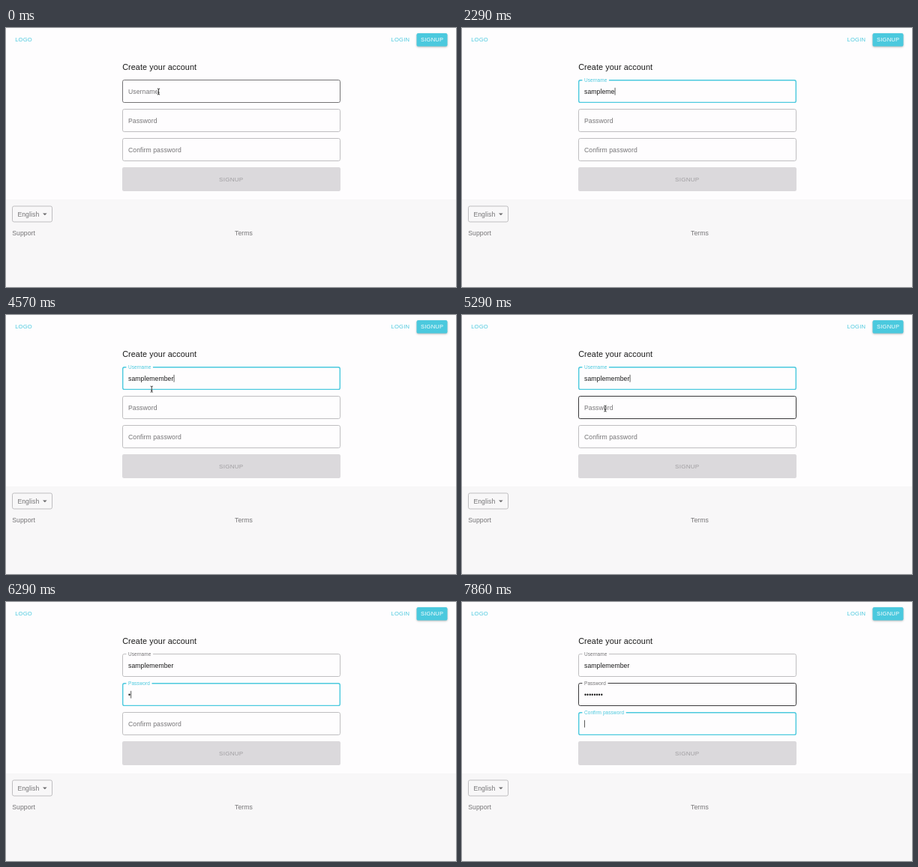
Write an HTML page with a canvas that moves like this. It is 600 px wide and 346 px high and loops after 8 s.

```html
<!DOCTYPE html>
<html lang="en">
<head>
<meta charset="utf-8">
<title>Sign-up form</title>
<style>
  html, body { margin: 0; width: 100%; height: 100%; overflow: hidden; background: #fefdfe; }
  canvas { display: block; width: 600px; height: 346px; }
</style>
</head>
<body>
<canvas id="stage"></canvas>
<script>
const canvas = document.getElementById('stage');
const ctx = canvas.getContext('2d');
const W = 600, H = 346, FPS = 7, LOOP = 8000;
const ratio = window.devicePixelRatio || 1;
canvas.width = W * ratio;
canvas.height = H * ratio;

const CYAN = '#4bc9de', GREY = '#757476', LINE = '#bfbec0', INK = '#1a1a1a';
const BODY = 8.64, SMALL = 7.57;
const LEFT = 163;
const NAME = 'samplemember';

// All event times are counted in ticks of 1/7 s.
const fields = [
  { label: 'Username', y: 69, focus: 2.8, blur: 38.8, hoverInk: '#747375',
    keys: [5, 6, 7, 8, 11, 12, 13, 14, 20, 21, 28, 29], value: n => NAME.slice(0, n) },
  { label: 'Password', y: 108, focus: 38.8, blur: 52.8, hoverInk: '#39383a',
    keys: [44, 45, 47, 48, 49, 50, 51, 52], value: n => '•'.repeat(n) },
  { label: 'Confirm password', y: 147, focus: 52.8, blur: Infinity, hoverInk: '#39383a',
    keys: [], value: () => '' }
];

const clamp = v => Math.max(0, Math.min(1, v));
const mix = (a, b, p) => a + (b - a) * p;
const easeOut = p => 1 - (1 - p) ** 3;
const smooth = p => p * p * (3 - 2 * p);

function setFont(size, spacing) {
  ctx.font = size + 'px "Liberation Sans", Arial, sans-serif';
  ctx.letterSpacing = size * spacing + 'px';
}

function text(str, x, y, size, color, spacing = 0.0094) {
  setFont(size, spacing);
  ctx.fillStyle = color;
  ctx.fillText(str, x, y);
}

function roundRect(x, y, w, h, r = 2.2) {
  ctx.beginPath();
  ctx.roundRect(x, y, w, h, r);
}

function pointerAt(tick) {
  if (tick < 5) return { x: mix(203.5, 196, smooth(clamp(tick / 3))), y: 85, visible: true };
  const p = smooth(clamp((tick - 30) / 5));
  return { x: mix(196, 191, p), y: mix(85, 125, p), visible: tick >= 30 && tick < 44 };
}

function drawPointer({ x, y }) {
  ctx.beginPath();
  ctx.moveTo(x - 1.6, y - 4);
  ctx.quadraticCurveTo(x, y - 4, x, y - 3);
  ctx.quadraticCurveTo(x, y - 4, x + 1.6, y - 4);
  ctx.moveTo(x, y - 3);
  ctx.lineTo(x, y + 3);
  ctx.moveTo(x - 1.6, y + 4);
  ctx.quadraticCurveTo(x, y + 4, x, y + 3);
  ctx.quadraticCurveTo(x, y + 4, x + 1.6, y + 4);
  ctx.moveTo(x - 1.1, y + 1.3);
  ctx.lineTo(x + 1.1, y + 1.3);
  ctx.strokeStyle = 'rgba(255,255,255,.8)';
  ctx.lineWidth = 2;
  ctx.stroke();
  ctx.strokeStyle = '#222';
  ctx.lineWidth = 0.9;
  ctx.stroke();
}

function drawField(f, tick, pointer) {
  const focused = tick >= f.focus && tick < f.blur;
  const hover = pointer.y >= f.y && pointer.y < f.y + 31;
  const lift = easeOut(clamp((tick - f.focus) / FPS / 0.2));
  const size = BODY * mix(1, 0.75, lift);

  if (focused) {
    ctx.strokeStyle = CYAN;
    ctx.lineWidth = 1.4;
    roundRect(155.7, f.y + 0.8, 289.6, 29.6);
  } else {
    ctx.strokeStyle = hover ? f.hoverInk : LINE;
    ctx.lineWidth = 1;
    roundRect(155.5, f.y + 0.5, 290, 30);
  }
  ctx.stroke();

  if (lift > 0.1) {
    setFont(BODY * 0.75, 0.0094);
    const gap = (ctx.measureText(f.label).width + 5.2) * lift;
    ctx.fillStyle = '#fefdfe';
    ctx.fillRect(160.4, f.y - 0.5, gap, 2.6);
  }
  text(f.label, LEFT, f.y + mix(18.6, 3.1, lift), size, focused ? CYAN : GREY);

  const typed = f.keys.filter(k => k <= tick);
  const value = f.value(typed.length);
  text(value, LEFT, f.y + 18.6, BODY, INK);

  const last = typed.length ? typed[typed.length - 1] : f.focus;
  if (focused && (tick - last) % FPS < FPS / 2) {
    ctx.fillStyle = '#333';
    ctx.fillRect(LEFT + 0.2 + ctx.measureText(value).width, f.y + 10.8, 0.8, 9.8);
  }
}

function drawPage() {
  ctx.fillStyle = '#fefdfe';
  ctx.fillRect(0, 0, W, H);
  ctx.fillStyle = '#f8f7f8';
  ctx.fillRect(0, 229, W, H - 229);

  text('LOGO', 12.2, 18.3, SMALL, CYAN, 0.0286);
  text('LOGIN', 513.6, 18.3, SMALL, CYAN, 0.0286);
  ctx.save();
  ctx.shadowColor = 'rgba(0,0,0,.28)';
  ctx.shadowBlur = 2.5 * ratio;
  ctx.shadowOffsetY = 0.9 * ratio;
  ctx.fillStyle = CYAN;
  roundRect(547.5, 7, 41, 17.6);
  ctx.fill();
  ctx.restore();
  text('SIGNUP', 553, 18.3, SMALL, '#fff', 0.0286);

  text('Create your account', 155.2, 55.7, 10.82, INK, 0.0075);

  ctx.fillStyle = '#dbd9dc';
  roundRect(155, 186, 291, 32);
  ctx.fill();
  text('SIGNUP', 284, 205, 8.12, '#a09ea1', 0.0286);

  ctx.strokeStyle = LINE;
  ctx.lineWidth = 1;
  roundRect(8.5, 238, 53, 21);
  ctx.stroke();
  text('English', 15.4, 251.5, BODY, GREY);
  ctx.fillStyle = '#6b6a6c';
  ctx.beginPath();
  ctx.moveTo(49, 247.4);
  ctx.lineTo(54.6, 247.4);
  ctx.lineTo(51.8, 250.2);
  ctx.fill();
  text('Support', 8.2, 277.1, BODY, GREY);
  text('Terms', 305, 277.1, BODY, GREY);
}

function draw(ms) {
  const tick = Math.floor((ms % LOOP + 5) * FPS / 1000) % (LOOP * FPS / 1000);
  const pointer = pointerAt(tick);
  ctx.setTransform(ratio, 0, 0, ratio, 0, 0);
  drawPage();
  fields.forEach(f => drawField(f, tick, pointer));
  if (pointer.visible) drawPointer(pointer);
}

const start = performance.now();
function loop() {
  draw(performance.now() - start);
  requestAnimationFrame(loop);
}
loop();
</script>
</body>
</html>
```
